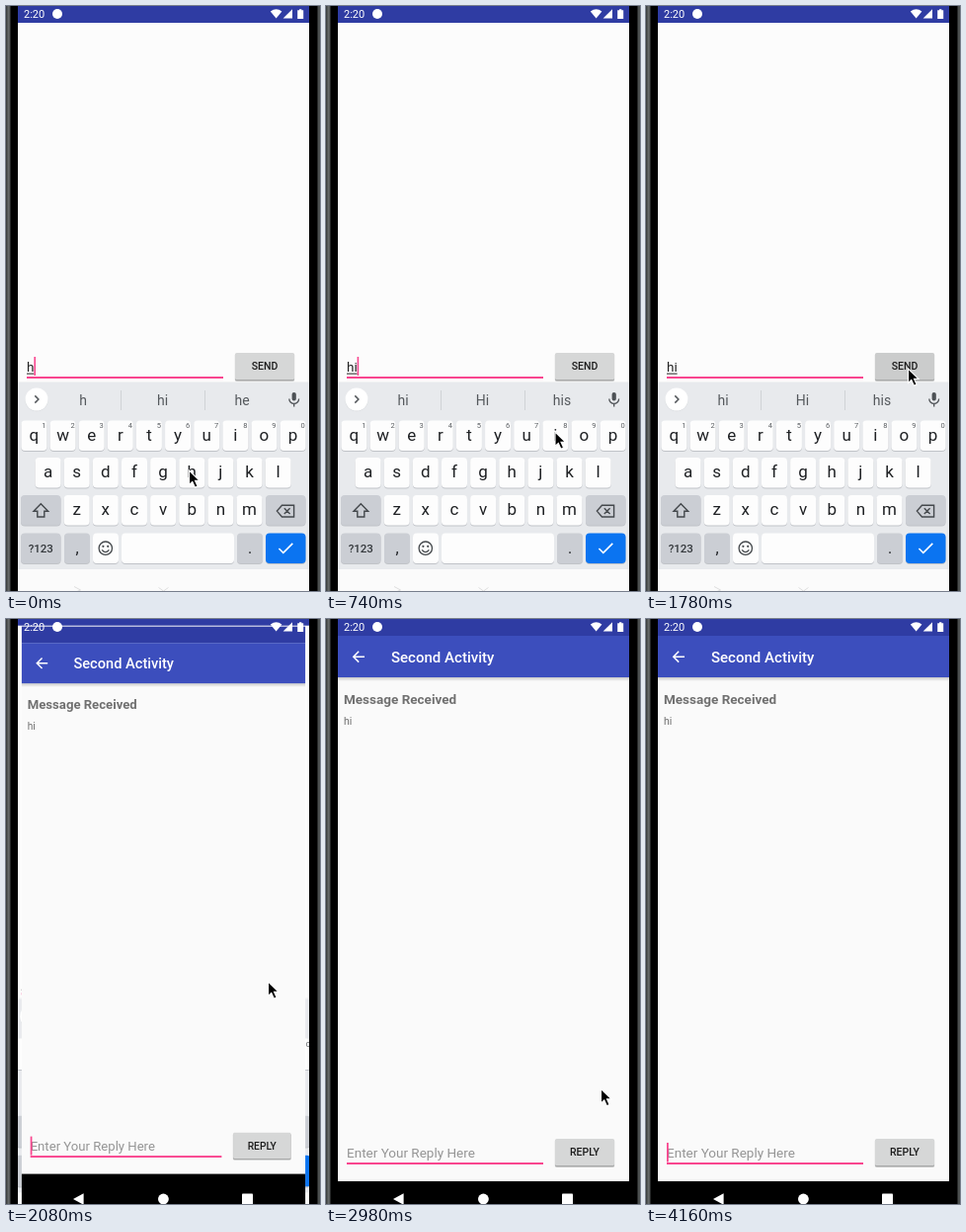
Animation, 318 px wide and 592 px high, one loop 4.49 s. Source, as an HTML page:

```html
<!DOCTYPE html>
<html lang="en">
<head>
<meta charset="utf-8">
<title>Two screens</title>
<style>
  html, body { margin: 0; width: 100%; height: 100%; overflow: hidden; background: #000; }
  svg { display: block; width: 318px; height: 592px; font-family: Roboto, "Noto Sans", sans-serif; }
  text { white-space: pre; }
</style>
</head>
<body>
<svg id="stage" viewBox="0 0 318 592" xmlns="http://www.w3.org/2000/svg">
  <defs>
    <clipPath id="screen"><rect x="12" y="0" width="295" height="592"/></clipPath>
    <clipPath id="sendClip"><rect x="232" y="351" width="60" height="27" rx="1.5"/></clipPath>
    <linearGradient id="edge">
      <stop offset="0" stop-color="#343838"/>
      <stop offset=".55" stop-color="#6a6e6e"/>
      <stop offset=".8" stop-color="#4a4d4d"/>
      <stop offset="1" stop-color="#000"/>
    </linearGradient>
    <linearGradient id="barShade" x2="0" y2="1">
      <stop offset="0" stop-color="#000" stop-opacity=".2"/>
      <stop offset="1" stop-color="#000" stop-opacity="0"/>
    </linearGradient>
  </defs>
  <rect width="318" height="592"/>
  <rect width="5" height="592" fill="url(#edge)"/>
  <rect x="315.5" width="2.5" height="592" fill="#4c5050"/>
  <g clip-path="url(#screen)">
    <g id="compose"></g>
    <g id="second"></g>
    <g id="status"></g>
    <g id="nav"></g>
  </g>
  <g id="pointer">
    <path d="M1 1V15.4L4.3 12.4L6.9 18.3L9.6 17.1L7 11.4H11.6Z" stroke="#fff" stroke-width="1.1"/>
  </g>
</svg>
<script>
const LOOP = 4490;
const $ = id => document.getElementById(id);
const PINK = '#f9468f';

function add(parent, tag, attrs, content) {
  const el = document.createElementNS('http://www.w3.org/2000/svg', tag);
  for (const k in attrs) el.setAttribute(k, attrs[k]);
  if (content !== undefined) el.textContent = content;
  parent.appendChild(el);
  return el;
}
const box = (p, x, y, width, height, fill, rx = 0) => add(p, 'rect', { x, y, width, height, fill, rx });
const line = (p, d, stroke, width = 1.4) =>
  add(p, 'path', { d, stroke, fill: 'none', 'stroke-width': width });
const shape = (p, d, fill) => add(p, 'path', { d, fill });
const label = (p, str, x, y, size, fill, more = {}) =>
  add(p, 'text', { x, y, 'font-size': size, fill, ...more }, str);
const MID = { 'text-anchor': 'middle' };
const MEDIUM = { 'font-weight': 500 };

function button(p, y, str) {
  box(p, 231.5, y + 1, 61, 28, '#000', 2).setAttribute('opacity', .08);
  box(p, 232, y + 1, 60, 27.4, '#a9aaaa', 1.5);
  box(p, 232, y, 60, 27, '#d6d7d7', 1.5);
  return () => label(p, str, 262, y + 17.3, 10.5, '#1c1c1c', { ...MID, ...MEDIUM });
}

// Compose screen
const compose = $('compose');
box(compose, 12, 0, 295, 592, '#fcfcfc');
box(compose, 12, 0, 295, 17, '#2f3ca3');
const typed = label(compose, '', 21, 370, 13.5, '#222');
const typedLine = box(compose, 21, 371.6, 8, 1, '#222');
box(compose, 21, 375, 199, 2, PINK);
const caret = box(compose, 28.4, 355, 1.6, 19, PINK);
const sendLabel = button(compose, 351, 'SEND');
const ripple = add(add(compose, 'g', { 'clip-path': 'url(#sendClip)' }), 'circle',
  { cx: 262.5, cy: 368.5, r: 0, fill: '#000' });
sendLabel();

// Keyboard
const WHITE = '#fdfdfd', GREY = '#cbced4', INK = '#1f2124';
box(compose, 12, 380, 295, 1, '#f1f2f3');
box(compose, 12, 381, 295, 189, '#e8eaed');
add(compose, 'circle', { cx: 31, cy: 398.7, r: 11.5, fill: '#d4d7da' });
add(compose, 'circle', { cx: 31, cy: 398, r: 11.5, fill: '#fff' });
line(compose, 'M29.3 394.4L32.9 398L29.3 401.6', '#55595d', 1.5);
const hints = [78, 158.5, 239].map(x => label(compose, '', x, 403.5, 14, '#55595d', MID));
[116, 201].forEach(x => box(compose, x, 389, 1, 20, '#d0d3d6'));
box(compose, 289.6, 391, 4.2, 8.6, '#4d5155', 2.1);
line(compose, 'M286.8 397.5A4.9 4.9 0 0 0 296.6 397.5M291.7 402.4V405.5', '#4d5155', 1.3);

function key(x, y, width, fill) {
  box(compose, x, y + 1, width, 30.4, '#c0c3c8', 4);
  box(compose, x, y, width, 30.4, fill, 4);
}
function row(letters, first, y, numbered) {
  [...letters].forEach((ch, i) => {
    const cx = first + i * 29.13;
    key(cx - 13, y, 26, WHITE);
    label(compose, ch, cx, y + 20.3, 17, INK, MID);
    if (numbered) label(compose, (i + 1) % 10, cx + 10, y + 7.8, 7.5, '#5a5e62', MID);
  });
}
row('qwertyuiop', 28.4, 419.5, true);
row('asdfghjkl', 42.6, 457, false);
row('zxcvbnm', 71.7, 495, false);
key(15, 495, 40.5, GREY);
key(263, 495, 40.5, GREY);
line(compose, 'M35.3 503.8L28 511.2H31.8V517H38.8V511.2H42.6Z', '#44484c');
line(compose, 'M279.5 505.2H291.6V517H279.5L274.4 511.1ZM281.8 508.2L287.6 514M287.6 508.2L281.8 514', '#44484c');

key(15, 533.5, 40.5, GREY);
label(compose, '?123', 35.3, 553, 11.5, '#33373b', { ...MID, ...MEDIUM });
key(59, 533.5, 26, GREY);
label(compose, ',', 72, 554, 16, INK, MID);
key(88, 533.5, 26, WHITE);
add(compose, 'circle', { cx: 100.8, cy: 548.7, r: 6.7, fill: 'none', stroke: '#44484c', 'stroke-width': 1.3 });
[98.4, 103.2].forEach(cx => add(compose, 'circle', { cx, cy: 546.8, r: 1.1, fill: '#44484c' }));
line(compose, 'M97.2 550.3Q100.8 555 104.4 550.3', '#44484c', 1.3);
key(117, 533.5, 114, WHITE);
key(234, 533.5, 26, GREY);
label(compose, '.', 247, 554, 16, INK, MID);
key(263, 533.5, 40.5, '#0b74f1');
line(compose, 'M276.4 549L280.8 553.3L290.3 543.9', '#fff', 1.6);

box(compose, 12, 570, 295, 22, '#fbfbfb');
line(compose, 'M69 587.5L75.5 591L72 592.5M154.5 588.5L159.5 592L164.5 588.5', '#dedede', 1);

// Enlarged key shown while it is held
const popup = add(compose, 'g', {});
box(popup, 217, 367, 31, 86, '#b9bcc1', 5);
box(popup, 217.6, 366.4, 29.8, 85.4, '#fdfdfd', 5);
label(popup, 'i', 232.5, 398, 23, INK, MID);

// Second screen
const second = $('second');
box(second, 12, 0, 295, 640, '#fafafa');
box(second, 12, 59, 295, 4, 'url(#barShade)');
box(second, 12, 0, 295, 17, '#2f3ca3');
box(second, 12, 17, 295, 42, '#3c4ebd');
line(second, 'M39 38.2H28M33.2 32.8L27.8 38.2L33.2 43.6', '#fff', 1.5);
label(second, 'Second Activity', 66, 44, 15, '#fff', MEDIUM);
label(second, 'Message Received', 18, 85.5, 13.5, '#707070', { 'font-weight': 700 });
label(second, 'hi', 18, 107, 10.5, '#707070');
label(second, 'Enter Your Reply Here', 21, 545, 13.5, '#959595');
box(second, 21, 550, 199, 2, PINK);
const replyCaret = box(second, 21, 530, 1.8, 19.5, PINK);
button(second, 526, 'REPLY')();
box(second, 12, 569, 295, 80, '#000');

// System bars
const status = $('status');
label(status, '2:20', 18, 12, 11, '#fff');
add(status, 'circle', { cx: 52, cy: 8, r: 5, fill: '#fff' });
shape(status, 'M267.8 5.4Q273.6 1.2 279.4 5.4L273.6 12.6Z', '#fff');
shape(status, 'M290 3.2V12.6H280.6Z', '#fff');
shape(status, 'M295.2 4.3H297V3.2H299.4V4.3H301.2V13H295.2Z', '#fff');
const nav = $('nav');
shape(nav, 'M68 587L78.6 581.2V592.8Z', '#fff');
add(nav, 'circle', { cx: 159.4, cy: 587, r: 5.4, fill: '#fff' });
box(nav, 239, 581.6, 11, 11, '#fff', .8);

// Each track lists [start time, value...]; values hold until the next step
const pointerTrack = [[0, 184.5, 469], [150, 209, 451], [300, 224, 441], [440, 231, 430],
  [890, 234, 421], [1030, 257, 379], [1180, 264.5, 366], [2830, 266, 382],
  [2980, 277.5, 474.5], [3130, 287, 531], [3270, -40, -40]];
const caretTrack = [[0, 1], [440, 0], [740, 1], [1180, 0]];
const replyCaretTrack = [[0, 1], [2680, 0], [3130, 1], [3570, 0], [4160, 1]];
const rippleTrack = [[0, 0, 0], [1480, 9, .04], [1630, 30, .04], [1780, 50, .05]];
const scaleTrack = [[0, 0, 1], [2080, .9735, 1.038], [2230, .9975, 1.04], [2380, 1, 0]];
const textTrack = [[0, 'h', 28.4, 'h', 'hi', 'he'], [740, 'hi', 31.6, 'hi', 'Hi', 'his']];

const at = (track, t) => track.filter(step => step[0] <= t).pop().slice(1);
const show = (el, on) => el.setAttribute('visibility', on ? 'visible' : 'hidden');
function zoom(el, k) {
  el.style.display = k ? '' : 'none';
  el.setAttribute('transform', `translate(159.5 289) scale(${k}) translate(-159.5 -289)`);
}

function draw(t) {
  const [px, py] = at(pointerTrack, t);
  $('pointer').setAttribute('transform', `translate(${px} ${py})`);

  const [word, end, ...words] = at(textTrack, t);
  typed.textContent = word;
  typedLine.setAttribute('width', end - 21);
  caret.setAttribute('x', end);
  words.forEach((w, i) => hints[i].textContent = w);

  show(caret, at(caretTrack, t)[0]);
  show(replyCaret, at(replyCaretTrack, t)[0]);
  show(popup, t >= 590 && t < 740);

  const [r, shade] = at(rippleTrack, t);
  ripple.setAttribute('r', r);
  ripple.setAttribute('opacity', shade);

  const [front, back] = at(scaleTrack, t);
  zoom(second, front);
  zoom(compose, back);
  show(nav, front);
}

const start = performance.now();
function tick() {
  draw((performance.now() - start) % LOOP);
  requestAnimationFrame(tick);
}
tick();
</script>
</body>
</html>
```
